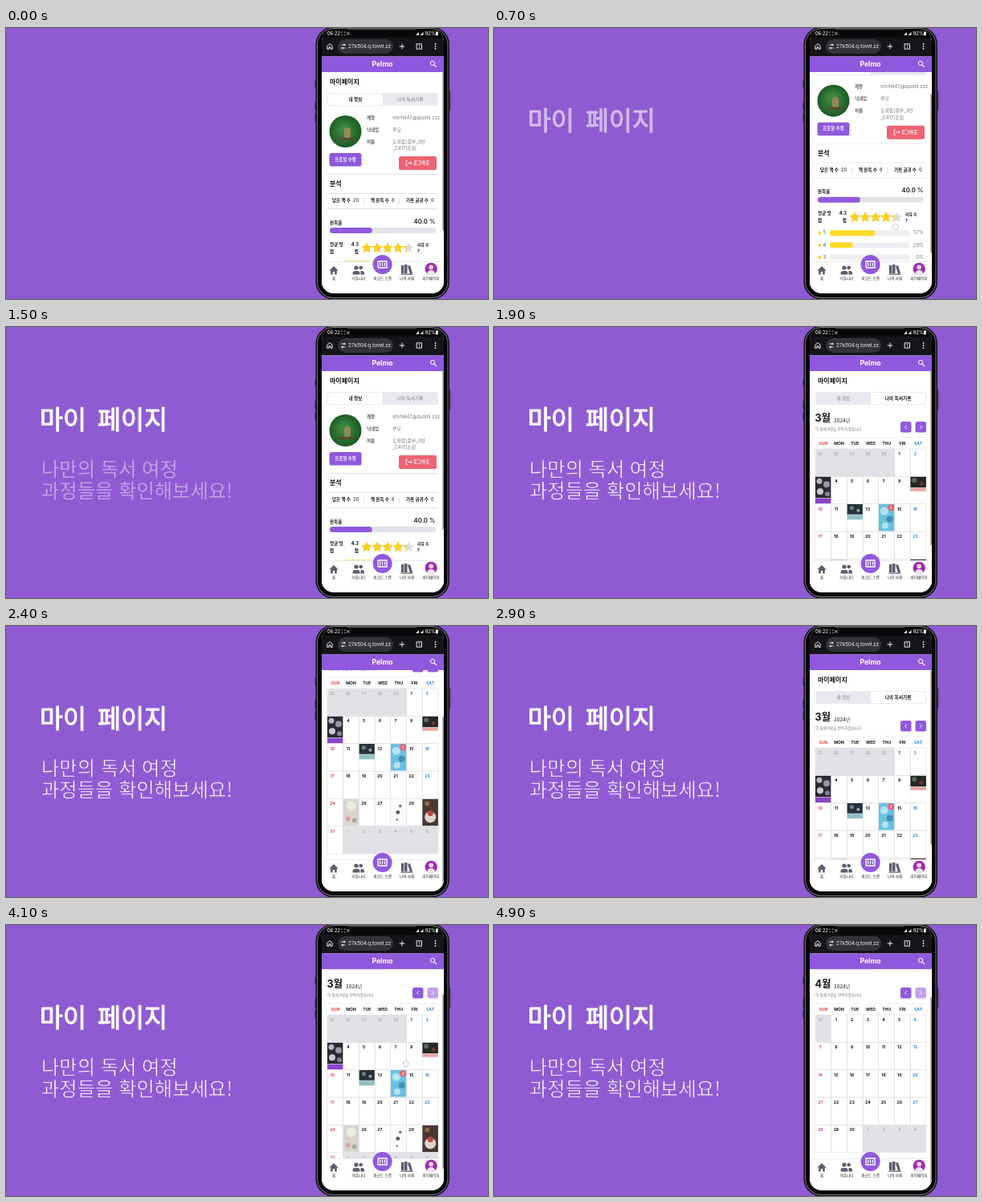
Animation of 600 by 338 pixels, one loop 5 s. Source, as an HTML page with a canvas:

```html
<!DOCTYPE html>
<html lang="ko">
<head>
<meta charset="utf-8">
<style>
  html, body { margin: 0; width: 100%; height: 100%; overflow: hidden; background: #8f5bd3; }
  canvas { display: block; width: 600px; height: 338px; }
</style>
</head>
<body>
<canvas id="stage"></canvas>
<script>
const canvas = document.getElementById('stage');
const dpr = window.devicePixelRatio || 1;
canvas.width = 600 * dpr;
canvas.height = 338 * dpr;
const c = canvas.getContext('2d');
c.scale(dpr, dpr);

const LOOP = 5000, STEP = 100;
const BACK = '#8f5bd3', PURPLE = '#8f59dd', PALE = '#c3a1f0', INK = '#141418', GREY = '#777780', YELLOW = '#fbdc28';
const UI = 'Inter, "Noto Sans CJK KR", "Noto Sans CJK", sans-serif';
const HANGUL = '"Noto Sans CJK KR", "Noto Sans CJK", sans-serif';

// [time, scroll offset]
const SCROLL = [[0, 0], [500, 0], [1000, 109], [1200, 109], [1500, 0], [2000, 0], [2300, 74],
  [2600, 74], [2900, 0], [3100, 0], [3300, 40], [4100, 40], [4300, 74], [4400, 74], [4600, 40], [5000, 40]];
// [from, to, x, y]
const TOUCHES = [[600, 1200, 500, 248], [1600, 1700, 503, 89], [3000, 3100, 512, 125],
  [3200, 3500, 509, 152], [3700, 3800, 531, 85], [4000, 4200, 498, 173], [4700, 4800, 531, 85]];
// day: [background, height, band colour, band height, ...dots as [colour, x, y, radius]]
const COVERS = {
  3: ['#2b2a33', 27, '#8a45c8', 6.5, ['#b7b6c4', 5, 6, 3.5], ['#9896a8', 14, 10, 4], ['#c9c8d6', 6, 19, 4], ['#85839a', 15, 22, 3]],
  9: ['#232825', 14, '#eba5a5', 4, ['#55685a', 5, 5, 3], ['#6d3338', 14, 9, 2.5]],
  12: ['#25323a', 13, '#93bfc6', 6, ['#70838b', 6, 5, 2.5], ['#9aa5aa', 14, 8, 2]],
  14: ['#69c1e0', 34, '', 0, ['#b5e3f2', 7, 9, 5], ['#3b93ba', 14, 19, 4], ['#b5e3f2', 8, 27, 4]],
  25: ['#d9d5ce', 34, '', 0, ['#eeeae5', 10, 9, 6], ['#d5a4a8', 6, 25, 3], ['#a5ad96', 14, 27, 3]],
  28: ['#fbfbfb', 34, '', 0, ['#88888c', 12, 9, 2], ['#55555a', 9, 17, 2.4], ['#99999e', 8, 26, 1.5]],
  30: ['#4a3830', 34, '', 0, ['#ddd5cc', 10, 23, 7], ['#b9473f', 10, 18, 3.5], ['#8d674d', 6, 6, 3]]
};

const clamp = v => Math.max(0, Math.min(1, v));

function scrollAt(t) {
  const i = SCROLL.findIndex(k => k[0] > t);
  const [t0, a] = SCROLL[i - 1], [t1, b] = SCROLL[i];
  const p = (t - t0) / (t1 - t0);
  return a + (b - a) * p * p * (3 - 2 * p);
}

function box(x, y, w, h, r, fill) {
  c.beginPath();
  c.roundRect(x, y, w, h, r);
  c.fillStyle = fill;
  c.fill();
}

function dot(x, y, r, fill) {
  c.beginPath();
  c.arc(x, y, r, 0, Math.PI * 2);
  c.fillStyle = fill;
  c.fill();
}

function ring(x, y, r, stroke, width) {
  c.beginPath();
  c.arc(x, y, r, 0, Math.PI * 2);
  c.strokeStyle = stroke;
  c.lineWidth = width;
  c.stroke();
}

function text(s, x, y, size, fill = INK, weight = 700, align = 'left', font = UI) {
  c.font = `${weight} ${size}px ${font}`;
  c.textAlign = align;
  c.textBaseline = 'middle';
  c.fillStyle = fill;
  c.fillText(s, x, y);
}

function line(path, x, y, stroke, width = 1) {
  c.save();
  c.translate(x, y);
  c.strokeStyle = stroke;
  c.lineWidth = width;
  c.stroke(new Path2D(path));
  c.restore();
}

function shape(path, x, y, fill) {
  c.save();
  c.translate(x, y);
  c.fillStyle = fill;
  c.fill(new Path2D(path));
  c.restore();
}

function clipped(x, y, w, h, r, draw) {
  c.save();
  c.beginPath();
  c.roundRect(x, y, w, h, r);
  c.clip();
  draw();
  c.restore();
}

function star(x, y, r, fill) {
  c.beginPath();
  for (let i = 0; i < 10; i++) {
    const a = i * Math.PI / 5 - Math.PI / 2, d = i % 2 ? r * 0.5 : r;
    c.lineTo(x + d * Math.cos(a), y + d * Math.sin(a));
  }
  c.closePath();
  c.fillStyle = fill;
  c.fill();
}

const rule = y => box(400, y, 137, 0.7, 0, '#d5d5da');

function pageTop(second) {
  text('마이페이지', 403, 68, 8);
  box(400, 81, 138, 16, 2, '#e9e9f0');
  box(second ? 469 : 401, 82, 68, 14, 2, '#fff');
  text('내 정보', 435, 89, 5.7, second ? GREY : INK, second ? 500 : 700, 'center');
  text('나의 독서기록', 503, 89, 5.7, second ? INK : GREY, second ? 700 : 500, 'center');
}

function profile() {
  pageTop(false);
  clipped(402.5, 109, 40, 40, 20, () => {
    const g = c.createRadialGradient(421, 126, 3, 422, 129, 22);
    g.addColorStop(0, '#3d8a43');
    g.addColorStop(1, '#17571f');
    box(402, 108, 42, 42, 0, g);
    box(421, 124, 8, 14, 4, '#94875a');
    box(414, 137, 20, 3, 1, '#5b4a2f');
  });
  box(402.5, 156, 40, 16.5, 2.5, PURPLE);
  text('프로필 수정', 422.5, 164, 5.5, '#fff', 700, 'center');
  [['계정', 'vmrtel47@quoml.zzz'], ['닉네임', '루모'], ['이름', '도하람[중부_3반']].forEach(([k, v], i) => {
    text(k, 449, 112 + i * 15, 5.5, '#55555e', 700);
    text(v, 481, 112 + i * 15, 5.9, GREY, 400);
  });
  text('_C417]조원', 481, 150.5, 5.9, GREY, 400);
  box(489, 160, 47, 17, 2.5, '#ed6372');
  line('M-1 -3H-3V3H-1M-1 0H4M2 -2L4 0L2 2', 501, 168.5, '#fff', 0.9);
  text('로그아웃', 507, 168.5, 5.5, '#fff', 600);

  rule(182);
  text('분석', 403, 195, 8);
  rule(206);
  [['담은 책 수', 406, 20, 432], ['책 완독 수', 454, 8, 480], ['기록 글귀 수', 498, 0, 529]].forEach(([k, x, n, nx]) => {
    text(k, x, 215.5, 5.5);
    text(n, nx, 215.5, 5.5, '#333338', 500);
  });
  box(445.5, 212, 0.6, 8, 0, '#ccccd2');
  box(489, 212, 0.6, 8, 0, '#ccccd2');
  rule(225);

  text('완독율', 403, 243, 5.6);
  text('40.0 %', 534.5, 241.5, 7.7, INK, 600, 'right');
  box(403, 249, 132, 7, 3.5, '#e2e2e8');
  box(403, 249, 52.8, 7, 3.5, PURPLE);

  text('평균 평', 403, 270, 5.6);
  text('점', 403, 279, 5.6);
  text('4.3', 439, 270, 5.8, INK, 700, 'right');
  text('점', 439, 279, 5.6, INK, 700, 'right');
  const stars = fill => { for (let i = 0; i < 5; i++) star(449 + i * 13, 274.5, 7, fill); };
  stars('#dcdce2');
  clipped(442, 266, 56.5, 17, 0, () => stars('#fbcf22'));
  text('리뷰 수', 512, 271, 4.8);
  text('7', 512, 278.5, 5);

  [57, 29, 0, 14, 0].forEach((pct, i) => {
    const y = 294 + i * 15.2;
    star(405.5, y, 2.8, '#fbcf22');
    text(5 - i, 409.5, y, 6, '#3f6fc0', 500);
    box(418, y - 3.5, 99.5, 7, 3.5, '#eeeef3');
    if (pct) box(418, y - 3.5, pct * 0.985, 7, 3, YELLOW);
    text(pct + '%', 535, y, 6, GREY, 400, 'right');
  });
}

function calendar(month, pressed) {
  const first = new Date(2024, month - 1, 1).getDay();
  const rows = Math.ceil((first + new Date(2024, month, 0).getDate()) / 7);
  const colW = 19.7, rowH = 34.35, left = 400, top = 152;
  pageTop(true);
  text(month + '월', 399.5, 114, 12.5);
  text('2024년', 423, 117, 5.9, '#333338', 500);
  text(`이 달에 ${month === 3 ? 8 : 0}권을 완독하였습니다.`, 400, 128, 4.6, GREY, 400);
  [506, 524.5].forEach((x, i) => {
    box(x, 118, 13.5, 13.5, 2.5, pressed === i ? PALE : PURPLE);
    line(i ? 'M-1.2 -2.5L1.3 0L-1.2 2.5' : 'M1.2 -2.5L-1.3 0L1.2 2.5', x + 6.7, 124.8, '#fff', 0.9);
  });
  box(left, 137, 138, 0.6, 0, '#e6e6ea');
  ['SUN', 'MON', 'TUE', 'WED', 'THU', 'FRI', 'SAT'].forEach((d, i) =>
    text(d, left + (i + 0.5) * colW, 145.5, 5.1, tint(i), 700, 'center'));

  for (let i = 0; i < rows * 7; i++) {
    const day = new Date(2024, month - 1, 1 - first + i);
    const x = left + i % 7 * colW, y = top + Math.floor(i / 7) * rowH;
    const inside = day.getMonth() === month - 1, n = day.getDate();
    if (!inside) box(x, y, colW, rowH, 0, '#e1e1e6');
    c.strokeStyle = '#dedee3';
    c.lineWidth = 0.6;
    c.strokeRect(x, y, colW, rowH);
    text(n, x + 6.2, y + 6.3, 5.1, inside ? tint(i % 7) : '#9d9da8', inside ? 700 : 500, 'center');
    if (inside && month === 3 && COVERS[n]) cover(COVERS[n], x, y);
    if (inside && month === 3 && n === 14) {
      dot(x + 15.5, y + 4.5, 4, '#ef5d6b');
      text(2, x + 15.5, y + 4.7, 5, '#fff', 600, 'center');
    }
  }
}

function tint(weekday) {
  return weekday === 0 ? '#e0444c' : weekday === 6 ? '#3384d2' : INK;
}

function cover([back, height, band, bandHeight, ...dots], x, y) {
  clipped(x, y + 0.4, 19.7, 33.6, 0, () => {
    box(x, y, 20, 34, 0, '#fff');
    box(x, y, 20, height, 0, back);
    dots.forEach(([fill, dx, dy, r]) => dot(x + dx, y + dy, r, fill));
    if (bandHeight) box(x, y + height + 0.5, 20, bandHeight, 0, band);
  });
}

function browserBar() {
  box(393, -5, 152, 18, 0, '#08080a');
  text('06:22', 400, 7, 5.7, '#eee', 500);
  line('M-2 -1V-2H-1M1 -2H2V-1M2 1V2H1M-1 2H-2V1', 420, 7, '#ddd', 0.7);
  line('M-2 -2L2 2M2 -2L-2 2', 426, 7, '#ddd', 0.7);
  shape('M-2 2H2V-2Z', 512, 7, '#ddd');
  shape('M-2 2H2V-2Z', 517.5, 7, '#ddd');
  text('92%', 521.5, 7, 6, '#eee', 500);
  box(535, 4.5, 2.8, 5, 0.7, '#eee');
  box(393, 12, 152, 23.5, 0, '#151519');
  line('M-3.2 -0.5L0 -3.3L3.2 -0.5V3.3H1V0.8H-1V3.3H-3.2Z', 403, 23, '#eee', 1);
  box(413, 14, 69, 18, 9, '#323239');
  line('M-3 -2H0M2 -2H3M-3 2H-2M0 2H3', 420, 23, '#ddd', 0.8);
  dot(421, 21, 1.2, '#ddd');
  dot(419, 25, 1.2, '#ddd');
  text('27k504.q.tovel.zz', 426, 23.3, 6.8, '#e4e4e8', 400, 'left', 'Roboto, sans-serif');
  line('M-3.4 0H3.4M0 -3.4V3.4', 493, 23, '#eee', 1);
  line('M-3.2 -3.2H3.2V3.2H-3.2Z', 514.3, 23, '#eee', 1);
  text('1', 514.3, 23.2, 4.6, '#eee', 600, 'center');
  [-3, 0, 3].forEach(dy => dot(534.5, 23 + dy, 0.9, '#eee'));
  box(393, 35.5, 152, 19.5, 0, PURPLE);
  text('Pelmo', 468.5, 45.3, 8.6, '#fff', 700, 'center');
  ring(531, 44, 2.6, '#fff', 1);
  line('M0 0L3 3', 533, 46, '#fff', 1.1);
}

function navBar() {
  box(393, 291, 152, 60, [8, 8, 0, 0], '#e4e4e9');
  box(393, 291.7, 152, 60, [8, 8, 0, 0], '#fff');
  const icon = '#5d5d70';
  shape('M-5.6 0.5L0 -5L5.6 0.5H3.8V5.5H1.2V2H-1.2V5.5H-3.8V0.5Z', 408, 302, icon);
  dot(436, 299, 2.6, icon);
  dot(441.7, 299, 2.3, icon);
  box(431.5, 303, 9, 4.5, [3, 3, 0, 0], icon);
  box(441.5, 303, 4.5, 4.5, [1, 3, 0, 0], icon);
  dot(468.6, 295, 12, PURPLE);
  line('M-5.5 -4H5.5V4H-5.5Z', 468.6, 295, '#fff', 1.3);
  line('M-3 -2.3V2.3M0 -2.3V2.3M3 -2.3V2.3', 468.6, 295, '#fff', 1.2);
  box(492, 296, 3.3, 10, 0.3, icon);
  box(496, 295, 3.5, 11, 0.3, icon);
  shape('M0 0L3 -1L6 9L3 10Z', 500, 297, icon);
  box(491.5, 306.5, 15, 1.2, 0, icon);
  clipped(521.5, 292.7, 15.4, 15.4, 7.7, () => {
    box(521, 292, 17, 17, 0, '#9b2bb0');
    dot(529.2, 298.3, 2.9, '#f6d5d2');
    dot(529.2, 307, 5, '#f0e6f4');
  });
  [['홈', 408], ['커뮤니티', 438.7], ['바코드 스캔', 468.6], ['나의 서재', 499], ['마이페이지', 529]].forEach(([s, x]) =>
    text(s, x, 312.5, 4.6, '#222228', 500, 'center'));
}

function phone(t) {
  box(384.5, 65, 3, 9, 1, '#37373d');
  box(384.5, 92, 3, 11, 1, '#37373d');
  box(384.5, 106, 3, 11, 1, '#37373d');
  box(550.5, 78, 2.8, 25, 1, '#37373d');
  box(385.5, -1.5, 166.5, 340, 22, '#0c0c0e');
  box(387, 0, 163.5, 337, 20.5, '#77777d');
  box(388, 1, 161.5, 335, 19.5, '#050507');

  const scroll = scrollAt(t), inCalendar = t >= 1700;
  const month = t >= 4700 ? 4 : t >= 3800 || t < 3100 ? 3 : 2;
  const pressed = t >= 3700 ? 1 : t >= 3000 ? 0 : -1;
  clipped(393, 2, 152, 329, 15, () => {
    box(393, 0, 152, 338, 0, '#fff');
    clipped(393, 55, 152, 245, 0, () => {
      c.translate(0, -scroll);
      inCalendar ? calendar(month, pressed) : profile();
    });
    navBar();
    browserBar();
    const extent = 276 + (!inCalendar ? 109 : month === 3 ? 74 : 40);
    box(543.4, 55 + scroll * 276 / extent, 1.6, 276 * 276 / extent, 0.8, '#8a8a90');
    TOUCHES.filter(([from, to]) => t >= from && t < to).forEach(([, , x, y]) => {
      dot(x, y, 3.6, 'rgba(255,255,255,.6)');
      ring(x, y, 3.6, '#b8b8c2', 0.7);
    });
  });
  box(425, 0.6, 86, 1.6, 0.8, '#4a4a50');
}

// A white outline thickens the strokes, one in the backdrop colour thins them.
function heading(s, x, y, size, gap, outline, width) {
  c.font = `400 ${size}px ${HANGUL}`;
  c.textAlign = 'left';
  c.textBaseline = 'alphabetic';
  c.wordSpacing = gap + 'px';
  c.lineJoin = 'round';
  c.lineWidth = width;
  c.fillStyle = '#fff';
  c.strokeStyle = outline;
  c.fillText(s, x, y);
  c.strokeText(s, x, y);
  c.wordSpacing = '0px';
}

function caption(t) {
  c.globalAlpha = clamp((t - 400) / 600);
  heading('마이 페이지', 42, 126.5, 31.5, 7, '#fff', 1.1);
  c.globalAlpha = clamp((t - 1200) / 600);
  heading('나만의 독서 여정', 44, 186, 24.3, 1.2, BACK, 0.6);
  heading('과정들을 확인해보세요!', 44, 213, 24.3, 1.2, BACK, 0.6);
  c.globalAlpha = 1;
  c.lineJoin = 'miter';
}

function frame() {
  const t = Math.floor(performance.now() % LOOP / STEP) * STEP;
  box(0, 0, 600, 338, 0, BACK);
  phone(t);
  if (t >= 500) caption(t);
  requestAnimationFrame(frame);
}
frame();
</script>
</body>
</html>
```
